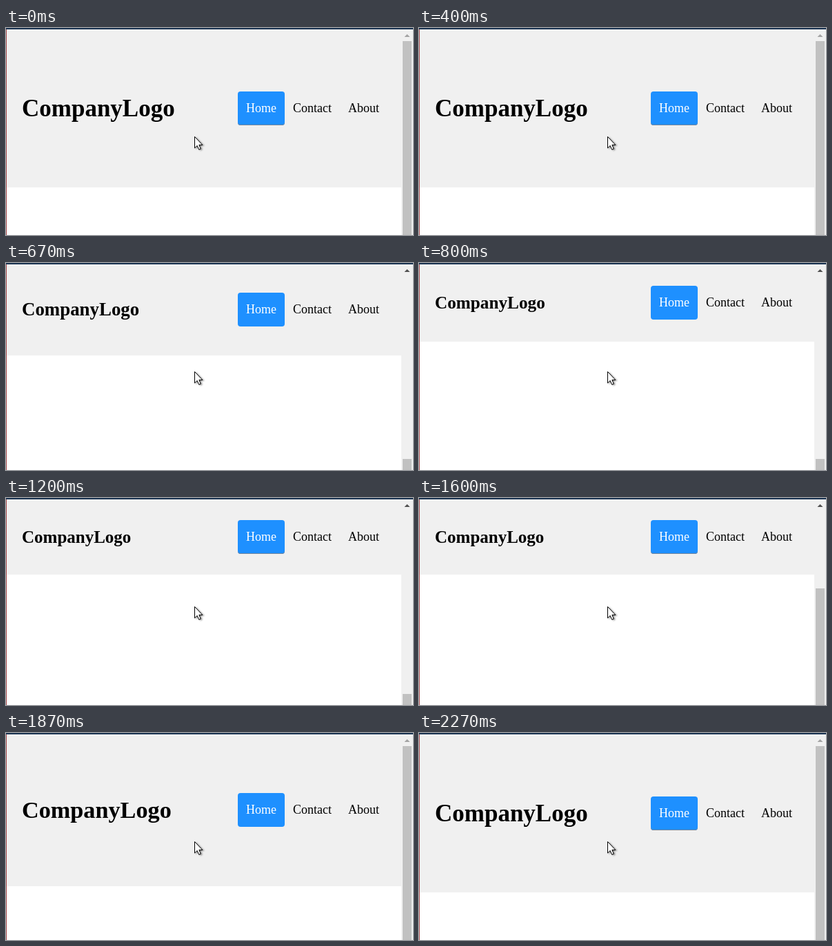
An HTML page for the animation above (2.34 s loop, 590x300 px).

```html
<!DOCTYPE html>
<html lang="en">
<head>
<meta charset="utf-8">
<title>Shrinking header</title>
<style>
  html, body { margin: 0; width: 100%; height: 100%; overflow: hidden; }
  body { position: relative; background: #fff; font: 18px/25px "Liberation Serif", "Times New Roman", serif; color: #000; }
  body > * { position: absolute; }
  #topbar { left: 0; top: 0; width: 100%; height: 2px; background: #1d3553; }
  #edge { left: 0; top: 2px; width: 1px; bottom: 0; background: #a5494c; }
  #header { left: 1px; top: 2px; width: 572px; background: #f0f0f0; }
  #logo { position: absolute; left: 22px; font-weight: bold; white-space: nowrap; }
  #nav { position: absolute; left: 335px; display: flex; }
  #nav span { padding: 12px; border-radius: 4px; }
  #nav .active { background: #1e90ff; color: #fff; }
  #nav .resting { box-shadow: inset 0 -1px #71849a; }
  #track { left: 573px; top: 2px; width: 17px; bottom: 0; background: #f0f0f0; }
  #thumb { left: 575px; width: 13px; bottom: 0; background: #c1c1c1; }
  svg { left: 0; top: 0; }
  #cursor { filter: drop-shadow(2px 1px 1px rgba(0, 0, 0, .4)); }
</style>
</head>
<body>
<div id="header">
  <div id="logo">CompanyLogo</div>
  <div id="nav"><span class="active" id="home">Home</span><span>Contact</span><span>About</span></div>
</div>
<div id="track"></div>
<div id="thumb"></div>
<div id="topbar"></div>
<div id="edge"></div>
<svg width="590" height="300">
  <path id="arrow" d="M577.5 13l4-4 4 4z"/>
  <path id="cursor" transform="translate(273 157)" fill="#fff" stroke="#000"
    d="M.5 .5v16.5l3.7-3.5 2.5 5.8 2.6-1.1-2.4-5.7h5z"/>
</svg>
<script>
const LOOP = 2340, STEP = 200 / 3;
const $ = id => document.getElementById(id);
const mix = (a, b, k) => a + (b - a) * k;

// CSS-style cubic-bezier easing, solved by bisection
function bezier(x1, y1, x2, y2) {
  const at = (a, b, u) => 3 * a * u * (1 - u) ** 2 + 3 * b * u * u * (1 - u) + u ** 3;
  return x => {
    if (x <= 0) return 0;
    if (x >= 1) return 1;
    let low = 0, high = 1;
    for (let i = 0; i < 24; i++) {
      const mid = (low + high) / 2;
      if (at(x1, x2, mid) < x) low = mid; else high = mid;
    }
    return at(y1, y2, low);
  };
}
const ease = bezier(.25, .1, .25, 1);
const easeInOut = bezier(.42, 0, .58, 1);
const phase = (curve, t, start, length) => curve((t - start) / length);

function draw(time) {
  const t = Math.floor((time % LOOP + 3.4) / STEP) * STEP;
  const scroll = phase(easeInOut, t, 403, 260) - phase(easeInOut, t, 1458, 260);
  const shrink = phase(ease, t, 438, 450) - phase(ease, t, 1608, 390);

  const padding = mix(90, 30, shrink);
  $("header").style.height = 49 + 2 * padding + "px";
  $("nav").style.top = padding + "px";
  $("logo").style.top = padding + 12 + "px";
  $("logo").style.fontSize = mix(35, 25, shrink) + "px";
  $("home").classList.toggle("resting", shrink < .005 || shrink > .995);
  $("thumb").style.top = Math.round(mix(19, 284, scroll)) + "px";
  $("arrow").setAttribute("fill", scroll > .001 ? "#505050" : "#a3a3a3");
}

const start = performance.now();
function tick() {
  draw(performance.now() - start);
  requestAnimationFrame(tick);
}
tick();
</script>
</body>
</html>
```
